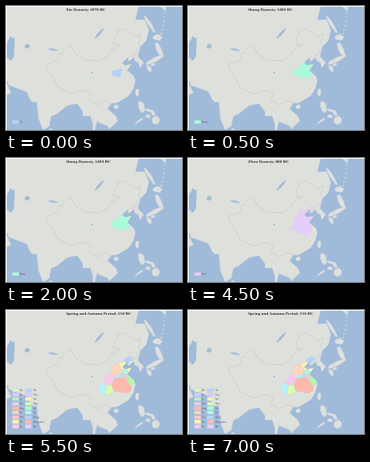
Animation, 220 px wide and 156 px high, one loop 8 s. Source, as a matplotlib script:

```python
import numpy as np
import matplotlib.pyplot as plt
from matplotlib.animation import FuncAnimation
from matplotlib.patches import Polygon, Rectangle

W, H, DPI = 220, 156, 100
PX = 72 / DPI
SEA, LAND, COAST, BORDER = "#a0bada", "#dee0dc", "#cbd4dc", "#c3c8ca"
BLUE, MINT, LILAC = "#b4d2fc", "#aafcd8", "#e6cdfb"
SALMON, PEACH, PINK, ROSE = "#fdb9ae", "#fdd5c0", "#fbc8ec", "#fbc7d0"
LIME, GREEN, YELLOW, CREAM = "#dafcae", "#b6f7ac", "#fdf5a4", "#fdfbc4"
CYAN, LAVENDER = "#b8f2f8", "#d6ccfb"

rng = np.random.default_rng(4)
fig = plt.figure(figsize=(W / DPI, H / DPI), dpi=DPI, facecolor=SEA)
ax = fig.add_axes([0, 0, 1, 1])
ax.set_xlim(0, W)
ax.set_ylim(H, 0)
ax.axis("off")


def project(points):
    """Conic projection of (lon, lat) into pixels, flattened in the south."""
    lon, lat = np.array(points, float).T
    lat = lat + 0.12 * np.maximum(30 - lat, 0)
    radius = 2.85 * (113.9 - lat)
    angle = np.radians(0.584 * (lon - 92))
    return np.column_stack([89.7 + radius * np.sin(angle),
                            -135 + radius * np.cos(angle)])


def shape(points, color, edge=COAST):
    return ax.add_patch(Polygon(points, facecolor=color, edgecolor=edge,
                                lw=0.4 * PX))


def blob(lon, lat, length, width, tilt, color=LAND, edge=COAST):
    """Slightly ragged ellipse, sized in pixels."""
    t = np.linspace(0, 2 * np.pi, 18, endpoint=False)
    r = rng.uniform(0.85, 1.15, t.size) / 2
    u, v, a = length * r * np.cos(t), width * r * np.sin(t), np.radians(tilt)
    offset = np.column_stack([u * np.cos(a) - v * np.sin(a),
                              u * np.sin(a) + v * np.cos(a)])
    shape(project([(lon, lat)]) + offset, color, edge)


# Key points of the coast, clockwise
pacific = [
    (20, 75), (90, 85), (170, 75), (160, 53), (156.7, 51), (155.7, 54),
    (160, 61), (155, 59.2), (142, 59.2), (135.3, 54.8), (141.3, 53),
    (140.3, 48), (136, 44.5), (131.5, 43.2), (127.5, 39.5), (129.3, 36),
    (126.4, 34.5), (126.6, 36.8), (125, 38), (125.2, 39.5), (121.3, 38.8),
    (122, 40.6), (117.7, 38.9), (118.9, 37.4), (122.6, 37.3),
    (119.3, 35), (121.8, 31.9), (122, 29.8), (119.7, 26), (116.6, 23.2),
    (110.4, 21), (108, 21.5),
]
indian = [
    (105.7, 18.9), (109, 14.5), (109.3, 12), (105, 8.6), (105, 10.2),
    (101, 12.7), (100.5, 13.5), (99.2, 9.4), (103, 5), (103, 1),
    (100, 5.5), (98.3, 8.2), (98.6, 12), (97.6, 16.2), (94.3, 16.2),
    (94.4, 18.5), (91.7, 22.6), (87, 21.4), (82.3, 16.7), (80.2, 15.4),
    (79.8, 10.3), (77.5, 8), (74.7, 13.5), (72.6, 21.5), (70.7, 20.8),
    (69, 22.2), (66.7, 25.2), (57.3, 25.7), (56.6, 27.1), (48.5, 30.2),
    (51.5, 25), (56.2, 26.1), (59.8, 22.5), (55, 17), (20, 20),
]
mainland = shape(project(pacific + indian), LAND)

islands = [
    # Sakhalin and Japan
    (142.7, 50.2, 23, 4, 58), (142.8, 43.4, 11, 7, 0),
    (140.2, 38.3, 21, 6, 65), (135.5, 35.2, 24, 5, -25),
    (133.5, 33.6, 6, 3, -25), (130.8, 32.6, 9, 5, 65),
    # Taiwan, Hainan, Philippines, Sri Lanka
    (121, 23.7, 10, 4, 95), (109.8, 19.2, 6, 5, 0), (121, 16.3, 14, 7, 75),
    (123.4, 13.5, 8, 3, 20), (124.9, 11.6, 8, 4, 60), (122.5, 10.7, 6, 4, 0),
    (118.4, 9.8, 12, 2, -35), (125, 7.6, 10, 10, 0), (80.7, 7.8, 8, 5, 90),
]
for island in islands:
    blob(*island)
for step in np.linspace(0, 1, 6):
    blob(146 + 9.5 * step, 44 + 6.5 * step, 2.5, 1, -25)

# Caspian, Aral, Balkhash, Baikal, Qinghai
lakes = [(50.8, 41.8, 30, 10, 95), (59.8, 45.1, 6, 5, 0),
         (76.3, 46.4, 11, 2, 8), (107.3, 53.6, 15, 2.5, -50),
         (100.1, 36.9, 2, 1.5, 0)]
for lake in lakes:
    blob(*lake, SEA, SEA)

north_border = [
    (73.6, 39.5), (80.2, 42.1), (80.3, 45), (82.5, 45.2), (83, 47.2),
    (87.5, 49.1), (91, 45.2), (96.4, 42.7), (105, 41.6), (112, 43.7),
    (111.9, 45), (119.8, 46.7), (115.7, 47.7), (116.7, 49.8), (121, 53.3),
    (125.6, 53), (130.9, 47.7), (134.8, 48.4), (131.1, 44.8), (130.6, 42.4),
    (124.3, 39.9),
]
south_border = [
    (108, 21.5), (105.3, 23.3), (101.2, 21.5), (97.6, 23.9), (98.7, 27.5),
    (94.6, 29.3), (88.8, 27.3), (81.5, 30.4), (78.9, 34.3), (74.6, 37.2),
    (73.6, 39.5),
]
for line in (north_border, south_border):
    ax.plot(*project(line).T, color=BORDER, lw=0.6 * PX)

ax.plot([0, W], [H - 0.5, H - 0.5], color="white", lw=PX)
ax.plot([0, 0, W, W], [H, 0, 0, H], color="white", lw=PX)


def region(points, color):
    patch = shape(points, color, "#cfcfd8")
    patch.set_clip_path(mainland)
    return patch


def cut(points, normal, limit):
    """Keep the part of a polygon where normal . p <= limit."""
    kept = []
    for p, q in zip(points, np.roll(points, -1, axis=0)):
        dp, dq = p @ normal - limit, q @ normal - limit
        if dp <= 0:
            kept.append(p)
        if dp * dq < 0:
            kept.append(p + (q - p) * dp / (dp - dq))
    return np.array(kept)


def divide(outline, seeds):
    """Split an outline into weighted cells around (x, y, size, color)."""
    for x, y, size, color in seeds:
        cell, here = np.array(outline, float), np.array([x, y])
        for x2, y2, size2, _ in seeds:
            there = np.array([x2, y2])
            if (x, y) != (x2, y2) and len(cell):
                limit = there @ there - here @ here + size**2 - size2**2
                cell = cut(cell, 2 * (there - here), limit)
        if len(cell):
            yield color, cell


def key(x, y, color, label):
    box = ax.add_patch(Rectangle((x, y), 8, 4.4, facecolor=color,
                                 edgecolor="#c4cad4", lw=0.4 * PX))
    text = ax.text(x + 9.5, y + 3.4, label, family="Liberation Serif",
                   size=3.2 * PX, color="#5c6876")
    return [box, text]


def era(name, regions, keys):
    title = ax.text(75, 6, name, family="Liberation Serif", weight="bold",
                    size=5.2 * PX, color="#2c2c2c")
    return ([title] + [region(p, c) for c, p in regions]
            + [part for k in keys for part in key(*k)])


xia = [(132, 83), (134, 81), (138, 81), (141, 79), (145, 79), (145, 82),
       (143, 84), (144, 88), (140, 90), (136, 88), (133, 87)]
shang = [(131, 82), (134, 78), (139, 78), (142, 73), (146, 68), (150, 70),
         (160, 68), (161, 74), (154, 79), (156, 83), (153, 89), (146, 91),
         (140, 89), (134, 89)]
zhou = [(125, 89), (131, 85), (133, 77), (138, 70), (142, 64), (146, 67),
        (151, 63), (156, 60), (157, 63), (151, 68), (161, 69), (159, 75),
        (151, 80), (153, 85), (154, 91), (151, 97), (147, 99), (143, 94),
        (138, 95), (134, 90)]
realm = [(114, 99), (121, 92), (126, 83), (132, 79), (132, 71), (139, 67),
         (146, 66), (149, 61), (155, 58), (159, 61), (153, 67), (162, 69),
         (161, 76), (154, 79), (162, 86), (163, 91), (156, 94), (157, 101),
         (150, 105), (136, 102), (130, 106), (123, 107)]
seeds = [
    (143, 95, 11, SALMON), (121, 99, 6, CYAN), (129, 100, 6, LIME),
    (129, 88, 6, PINK), (138, 76, 7, PEACH), (147, 71, 5, YELLOW),
    (155, 73, 5, CREAM), (154, 62, 5, BLUE), (141, 84, 4, CYAN),
    (146, 82, 3, LAVENDER), (149, 78, 4, MINT), (151, 83, 3, ROSE),
    (157, 87, 6, GREEN),
]
columns = [
    (7.5, "Qin Jin Qi Chu Song Lu Wu Yue Ba",
     [LIME, LAVENDER, GREEN, LILAC, SALMON, PEACH, ROSE, YELLOW, PINK]),
    (24, "Yan Wey Cao Chen Cai Xu Zheng Zhongshan Shu",
     [BLUE, LAVENDER, YELLOW, LIME, MINT, CYAN, BLUE, SALMON, LILAC]),
]
state_keys = [(x, 98.5 + 5.7 * i, color, name)
              for x, names, colors in columns
              for i, (name, color) in enumerate(zip(names.split(), colors))]

eras = [era(name, [(color, area)], [(7.5, 143.8, color, label)])
        for name, label, color, area in [
            ("Xia Dynasty, 2070 BC", "Xia", BLUE, xia),
            ("Shang Dynasty, 1400 BC", "Shang", MINT, shang),
            ("Zhou Dynasty, 800 BC", "Zhou", LILAC, zhou)]]
eras.append(era("Spring and Autumn Period, 550 BC",
                divide(realm, seeds), state_keys))


def draw(step):
    """Half a second of the first era, then 2.5 s of each other one."""
    current = (step + 4) // 5
    for i, parts in enumerate(eras):
        for part in parts:
            part.set_visible(i == current)
    return []


anim = FuncAnimation(fig, draw, frames=16, interval=500, repeat=True,
                     repeat_delay=0)
plt.show()
```
